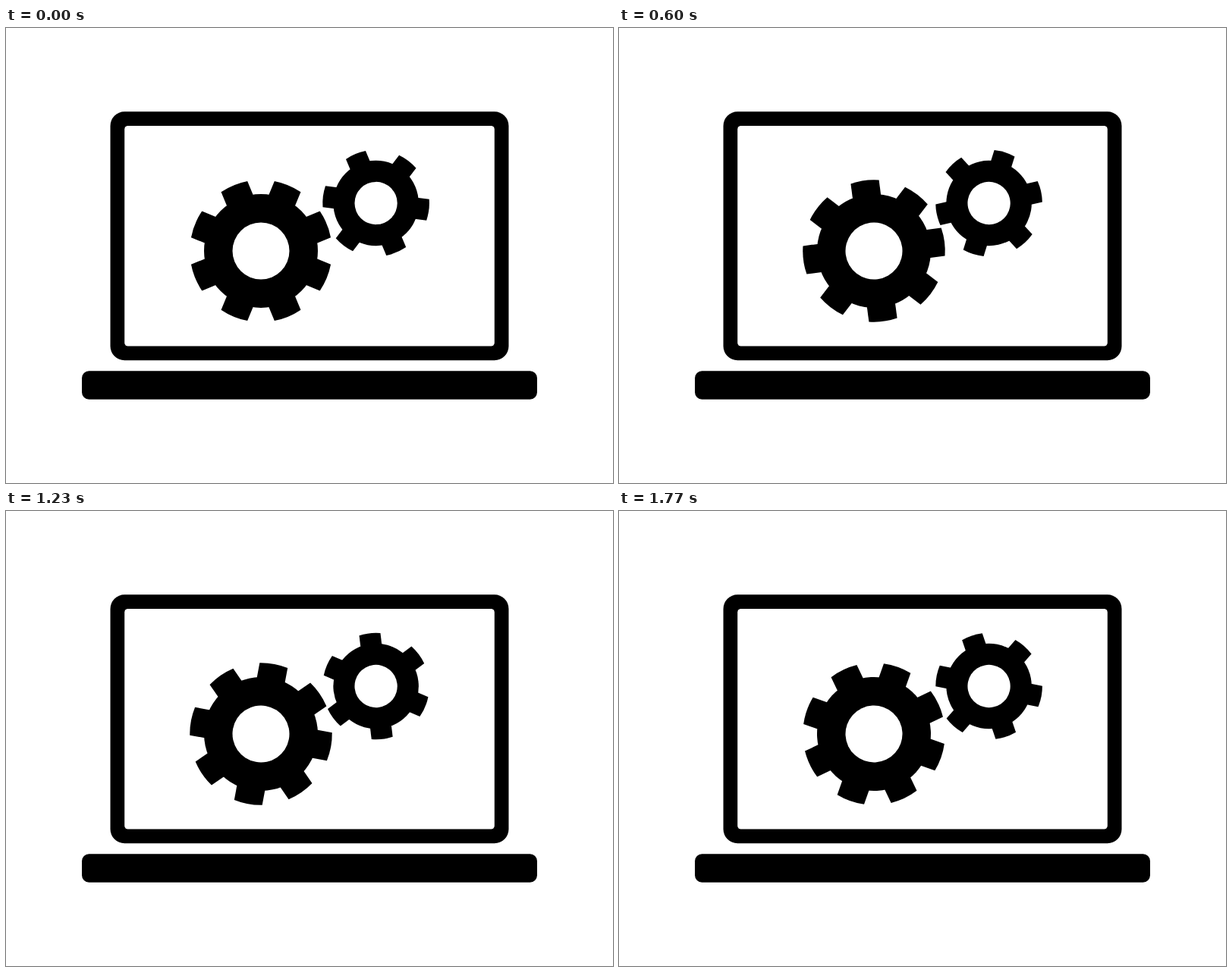
An HTML page for the animation above (1800 ms loop, 800 px wide and 600 px high).

```html
<!DOCTYPE html>
<html lang="en">
<head>
<meta charset="utf-8">
<title>Laptop with gears</title>
<style>
  html, body { margin: 0; width: 100%; height: 100%; overflow: hidden; background: #fff; }
  svg { display: block; width: 800px; height: 600px; }
</style>
</head>
<body>
<svg viewBox="0 0 800 600">
  <rect x="137.5" y="110.3" width="525" height="328" rx="18.75"/>
  <rect x="156.2" y="129" width="487.6" height="290.5" rx="4.5" fill="#fff"/>
  <rect x="100" y="452.2" width="600" height="37.5" rx="9.4"/>
  <g id="big"></g>
  <g id="small"></g>
</svg>
<script>
const STEP = 30, STEPS = 60;

// Sizes are in units of the big gear; degrees run clockwise from the top.
const gears = [
  { id: 'big', x: 336, y: 294, scale: 1, teeth: 8, start: 22.5, turn: 3 },
  { id: 'small', x: 487.6, y: 231, scale: 0.75, teeth: 6, start: -22.75, turn: -4 }
];

const RADIUS = 93.75, HALF = 18.75;
const tipY = -Math.sqrt(RADIUS * RADIUS - HALF * HALF);
const tooth = `M${-HALF} 0V${tipY}A${RADIUS} ${RADIUS} 0 0 1 ${HALF} ${tipY}V0Z`;

for (const gear of gears) {
  gear.node = document.getElementById(gear.id);
  let parts = '<circle r="75"/>';
  for (let i = 0; i < gear.teeth; i++) {
    parts += `<path d="${tooth}" transform="rotate(${i * 360 / gear.teeth})"/>`;
  }
  gear.node.innerHTML = parts + '<circle r="37.5" fill="#fff"/>';
}

function draw(time) {
  const step = Math.floor(time / STEP) % STEPS;
  for (const { node, x, y, scale, start, turn } of gears) {
    node.setAttribute('transform',
      `translate(${x} ${y}) rotate(${start + step * turn}) scale(${scale})`);
  }
}

const begin = performance.now();
function tick() {
  draw(performance.now() - begin);
  requestAnimationFrame(tick);
}
tick();
</script>
</body>
</html>
```
